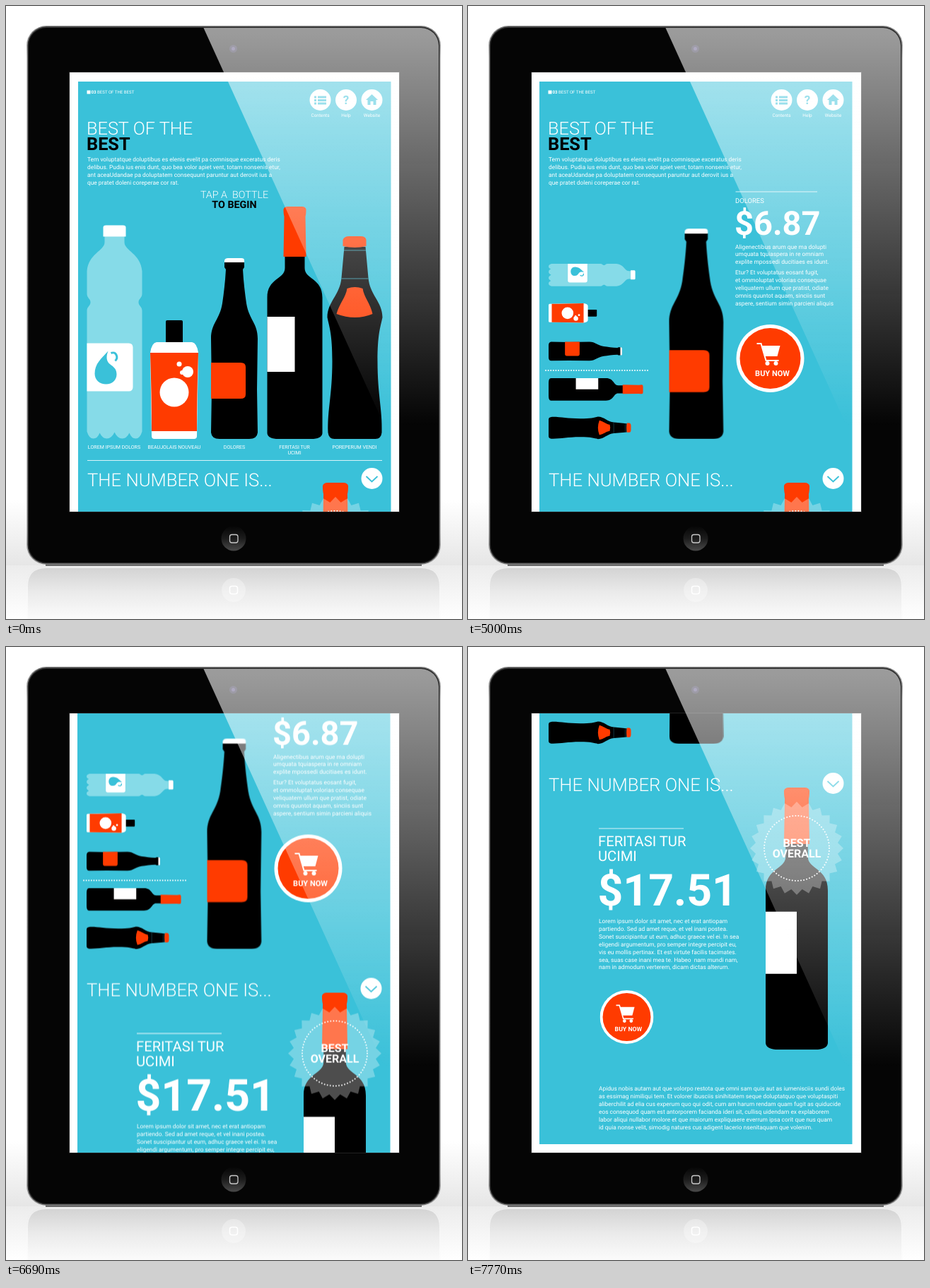
An HTML page for the animation above (8700 ms loop, 645 px wide and 868 px high).

```html
<!DOCTYPE html>
<html lang="en">
<head>
<meta charset="utf-8">
<title>Best of the Best</title>
<style>
  html, body { margin: 0; width: 100%; height: 100%; overflow: hidden; background: #fff; }
  svg { display: block; width: 645px; height: 868px; }
  text { font-family: Roboto, "Open Sans", sans-serif; fill: #fff; text-rendering: geometricPrecision; white-space: pre; }
  .copy { font-size: 8.35px; }
  .light { font-weight: 300; }
  .bold { font-weight: 700; }
  .ink { fill: #000; }
  .mid { text-anchor: middle; }
  .tag { font-size: 7.07px; text-anchor: middle; }
  .nav { font-size: 6.5px; text-anchor: middle; }
  .name { font-size: 9.45px; }
  .price { font-size: 47px; font-weight: 700; }
  .red { fill: #ff3b00; }
  .cyan { fill: #3ac1d9; }
  .white { fill: #fff; }
  .rule { stroke: #fff; stroke-width: 1; opacity: .8; }
  .dots { fill: none; stroke: #fff; stroke-width: 2; stroke-linecap: round; stroke-dasharray: 0 3.6; }

  .nudge, .home, .cue, .detail, .water, .can, .beer { animation: 8700ms step-end infinite; }
  .nudge { animation-name: nudge; }
  .home { animation-name: home; }
  .cue { animation-name: cue; }
  .detail { animation-name: detail; }
  .water { animation-name: water; }
  .can { animation-name: can; }
  .beer { animation-name: beer; }
  .scroll { animation: scroll 8700ms linear infinite; }
  @keyframes nudge {
    0%, 22.989% { transform: translateX(1px); }
    11.839%, 34.483%, 100% { transform: translateX(0); }
  }
  @keyframes home { 0% { opacity: 1; } 34.483%, 100% { opacity: 0; } }
  @keyframes cue { 0%, 22.989% { opacity: 1; } 11.839%, 34.483%, 100% { opacity: 0; } }
  @keyframes detail { 0% { opacity: 0; } 34.483%, 100% { opacity: 1; } }
  @keyframes water { 0%, 45.977%, 100% { opacity: 0; } 34.483% { opacity: 1; } }
  @keyframes can { 0%, 57.471%, 100% { opacity: 0; } 45.977% { opacity: 1; } }
  @keyframes beer { 0% { opacity: 0; } 57.471%, 100% { opacity: 1; } }
  @keyframes scroll {
    0% { transform: translateY(0); }
    68.9655% { transform: translateY(0); animation-timing-function: steps(59, end); }
    89.3103%, 100% { transform: translateY(-476px); }
  }
</style>
</head>
<body>
<svg viewBox="0 0 645 868">
  <defs>
    <linearGradient id="floor" x2="0" y2="1">
      <stop offset="0" stop-color="#fff"/><stop offset="1" stop-color="#e6e6e6"/>
    </linearGradient>
    <linearGradient id="below" x2="0" y2="1">
      <stop offset="0" stop-color="#ececec"/><stop offset="1" stop-color="#fff"/>
    </linearGradient>
    <linearGradient id="mirror" x2="0" y2="1">
      <stop offset="0" stop-color="#d2d2d2"/><stop offset=".5" stop-color="#ebebeb"/><stop offset="1" stop-color="#fbfbfb"/>
    </linearGradient>
    <linearGradient id="metal" x2="0" y2="1">
      <stop offset="0" stop-color="#777"/><stop offset=".06" stop-color="#c9c9c9"/>
      <stop offset=".94" stop-color="#bbb"/><stop offset="1" stop-color="#888"/>
    </linearGradient>
    <linearGradient id="shine" gradientUnits="userSpaceOnUse" x1="0" y1="30" x2="0" y2="595">
      <stop offset="0" stop-color="#fff" stop-opacity=".61"/><stop offset="1" stop-color="#fff" stop-opacity="0"/>
    </linearGradient>
    <linearGradient id="button" x2="0" y2="1">
      <stop offset="0" stop-color="#060606"/><stop offset=".5" stop-color="#1c1c1c"/><stop offset="1" stop-color="#4a4a4a"/>
    </linearGradient>
    <clipPath id="screen"><rect x="90" y="94" width="466" height="622"/></clipPath>
    <clipPath id="body"><rect x="32" y="31" width="580" height="757" rx="25"/></clipPath>

    <!-- bottles stand on y = 0 with their left side at x = 0 -->
    <g id="waterBottle">
      <path fill="#86dbe8" d="M25 -287V-278C25 -266 2 -262 0 -237V-205C0 -199 5 -198 5 -193C5 -188 0 -187 0 -181V-10Q3 0 9 0Q15 0 18 -8Q22 0 28 0Q35 0 39 -9Q43 0 50 0Q56 0 60 -8Q63 0 69 0Q75 0 78 -10V-181C78 -187 73 -188 73 -193C73 -198 78 -199 78 -205V-237C76 -262 53 -266 53 -278V-287Z"/>
      <path class="white" d="M23 -286V-299Q23 -302 27 -302H51Q55 -302 55 -299V-286ZM0 -135H59Q65 -135 65 -129V-73Q65 -67 59 -67H0Z"/>
      <path class="cyan" d="M30 -124C20 -113 11 -106 11 -92C11 -83 18 -77 27 -77C36 -77 42 -83 42 -91C42 -99 37 -102 33 -105C27 -109 27 -117 30 -124Z"/>
      <path fill="none" stroke="#3ac1d9" stroke-width="3" d="M34 -121C41 -124 45 -115 40 -110"/>
    </g>
    <g id="canBottle">
      <rect x="22" y="-168" width="24" height="36" rx="2"/>
      <path class="white" d="M9 -137H59Q66 -136 68 -122L66 -4Q66 0 62 0H6Q2 0 2 -4L0 -122Q2 -136 9 -137Z"/>
      <path class="red" d="M0 -122H68Q66 -60 66 -11H2Q2 -60 0 -122Z"/>
      <g class="white"><circle cx="34" cy="-66" r="20.5"/><circle cx="53" cy="-95" r="8"/><circle cx="41" cy="-106" r="3.5"/><circle cx="45" cy="-94" r="3"/></g>
    </g>
    <g id="beerBottle">
      <path d="M19 -251H47V-243L45 -240C46 -222 48 -206 50 -192C54 -168 66 -164 66 -142L65 -70L66 -9Q65 0 54 0H12Q1 0 0 -9L1 -70L0 -142C0 -164 12 -168 16 -192C18 -206 20 -222 21 -240L19 -243Z"/>
      <path class="white" d="M19 -250V-253Q20 -256 24 -256H43Q47 -256 47 -253V-250Z"/>
      <path class="red" d="M0 -108H42Q49 -108 49 -102V-63Q49 -57 42 -57H0Z"/>
    </g>
    <g id="wineBottle">
      <path d="M25 -260H53V-242C53 -226 78 -228 78 -200V-8Q77 0 62 0H16Q1 0 0 -8V-200C0 -228 25 -226 25 -242Z"/>
      <path class="red" d="M23 -258L24 -315Q23 -318 23 -325Q24 -329 29 -329H49Q54 -329 55 -325Q55 -318 54 -315L55 -258Z"/>
      <path class="white" d="M0 -173H39V-95H0Z"/>
    </g>
    <g id="sparkling">
      <path d="M24 -272H54L58 -228C60 -204 78 -194 78 -172C75 -158 71 -148 71 -110C71 -62 78 -42 77 -9Q76 0 68 0H10Q2 0 1 -9C0 -42 7 -62 7 -110C7 -148 3 -158 0 -172C0 -194 18 -204 20 -228Z"/>
      <path fill="none" stroke="#3ac1d9" stroke-width=".7" d="M23 -267H55M20 -227H58"/>
      <path class="red" d="M22 -273V-282Q24 -287 31 -287H47Q54 -287 55 -282V-273Q39 -269 22 -273ZM28 -213Q39 -217 50 -213C52 -200 61 -192 64 -177Q52 -172 39 -172Q26 -172 13 -177C17 -192 26 -200 28 -213Z"/>
    </g>

    <g id="buy">
      <circle r="48" class="white"/><circle r="43" class="red"/>
      <path fill="none" stroke="#fff" stroke-width="2" d="M-19 -21H-13L-6 3H12"/>
      <path class="white" d="M-12 -18H14L10 -3H-8Z"/>
      <circle class="white" cx="-4" cy="7" r="3"/><circle class="white" cx="8" cy="7" r="3"/>
      <text class="bold mid" x="3" y="25" font-size="11">BUY NOW</text>
    </g>
  </defs>

  <!-- floor and reflection -->
  <rect y="700" width="645" height="92" fill="url(#floor)"/>
  <rect y="792" width="645" height="76" fill="url(#below)"/>
  <path fill="url(#mirror)" d="M29 868V822Q29 794 57 794H587Q615 794 615 822V868Z"/>
  <path fill="none" stroke="#fff" stroke-opacity=".6" stroke-width="2" d="M30 868V822Q30 795 57 795H587Q614 795 614 822V868"/>
  <circle cx="322" cy="827" r="17" fill="#fff" opacity=".3"/>
  <rect x="316.500" y="821.500" width="11" height="11" rx="3" fill="none" stroke="#fff" stroke-width="1.500"/>
  <path d="M56 791.500H588" stroke="#555" stroke-width="2.500"/>

  <!-- tablet -->
  <rect x="29" y="28" width="586" height="763" rx="28" fill="url(#metal)"/>
  <rect x="30.500" y="29.500" width="583" height="760" rx="26.500" fill="#2a2a2a"/>
  <rect x="32" y="31" width="580" height="757" rx="25" fill="#050505"/>
  <circle cx="321.500" cy="60.500" r="5.500" fill="#1b1730"/>
  <circle cx="321.500" cy="60.500" r="2.500" fill="#43386e"/>
  <circle cx="322" cy="754" r="17.500" fill="url(#button)"/>
  <rect x="316.500" y="748.500" width="11.500" height="11.500" rx="3" fill="none" stroke="#c8c8c8" stroke-width="1.300"/>
  <rect x="89" y="93" width="468" height="624" fill="#222"/>

  <g clip-path="url(#screen)">
    <rect x="90" y="94" width="466" height="622" fill="#fff"/>
    <g class="scroll"><g class="nudge">
      <rect class="cyan" x="101" y="107" width="442.500" height="1073"/>

      <!-- header -->
      <rect class="white" x="113.500" y="119.500" width="5" height="5"/>
      <text class="bold" x="119.500" y="124.300" font-size="6.200">03</text>
      <text x="128" y="124.300" font-size="6.100">BEST OF THE BEST</text>
      <g class="white"><circle cx="443.500" cy="133" r="15"/><circle cx="480" cy="133" r="15"/><circle cx="516.500" cy="133" r="15"/></g>
      <g class="cyan">
        <path d="M435 127.500h3v3h-3zm5 0h12v3h-12zm-5 4.500h3v3h-3zm5 0h12v3h-12zm-5 4.500h3v3h-3zm5 0h12v3h-12z"/>
        <path d="M516.500 125L525 133H522.500V140H518.500V135H514.500V140H510.500V133H508Z"/>
      </g>
      <text class="bold mid" x="480" y="139" font-size="17" style="fill:#3ac1d9">?</text>
      <text class="nav" x="443.500" y="157">Contents</text>
      <text class="nav" x="480" y="157">Help</text>
      <text class="nav" x="516.500" y="157">Website</text>
      <text class="light" x="113" y="182" font-size="25.300">BEST OF THE</text>
      <text class="bold ink" x="113" y="204" font-size="25.300">BEST</text>
      <text class="copy" x="114" y="220">Tem voluptatque doluptibus es elenis evelit pa comnisque exceratus deris
delibus. Pudia ius enis dunt, quo bea volor apiet vent, totam nonsenis etur,
ant aceaUdandae pa doluptatem consequunt paruntur aut derovit ius a
que pratet doleni coreperae cor rat.</text>

      <!-- shelf of five -->
      <g class="home">
        <use href="#waterBottle" x="113.500" y="612.500"/>
        <use href="#canBottle" x="203" y="613"/>
        <use href="#beerBottle" x="289" y="613"/>
        <use href="#wineBottle" x="368.500" y="613"/>
        <use href="#sparkling" x="453.500" y="613"/>
        <text class="tag" x="152" y="626.500">LOREM IPSUM DOLORS</text>
        <text class="tag" x="237" y="626.500">BEAUJOLAIS NOUVEAU</text>
        <text class="tag" x="322" y="626.500">DOLORES</text>
        <text class="tag" x="407" y="626.500">FERITASI TUR</text>
        <text class="tag" x="407" y="635">UCIMI</text>
        <text class="tag" x="492" y="626.500">POREPERUM VENDI</text>
        <path class="rule" d="M114 643.500H531"/>
      </g>
      <g class="cue">
        <text class="light mid" x="322" y="271.500" font-size="14.300">TAP A  BOTTLE</text>
        <text class="bold ink mid" x="322" y="286" font-size="14.300">TO BEGIN</text>
      </g>

      <!-- single bottle -->
      <g class="detail">
        <g id="rack"></g>
        <path class="rule" d="M378.500 263H494"/>
        <use href="#buy" x="427.500" y="499"/>
        <g class="water">
          <path class="dots" d="M110 408H257"/>
          <use href="#waterBottle" x="283.500" y="612.500"/>
          <text class="name" x="378" y="279">LOREM IPSUM DOLORS</text>
          <text class="price" x="377" y="324">$2.99</text>
          <text class="copy" x="378" y="343">Lorem ipsum dolor sit amet, nec et erat
antiopam partiendo. Sedam am reque, et
vel inani postea. Sonet suscipiantur ut
eum, adhuc graece vel ei. In sea eligendi
argumentum, pro semper integre
percipit eu, vis eu mollis pertinax. Et est
virtute facilis tacimates. sea, suas case.</text>
        </g>
        <g class="can">
          <path class="dots" d="M110 462H257"/>
          <use href="#canBottle" transform="translate(271 613) scale(1.5)"/>
          <text class="name" x="378" y="279">BEAUJOLAIS NOUVEAU</text>
          <text class="price" x="377" y="324">$4.25</text>
          <text class="copy" x="378" y="343">Apidus nobis autam aut que volorpo
restota que omni sam quis aut as
iumenisciis sundi doles as essimag
nimiliqui tem. Et volorer ibusciis
sinihitatem seque doluptatquo que
voluptaspiti aliberchilit ad elia cus.</text>
        </g>
        <g class="beer">
          <path class="dots" d="M110 516H257"/>
          <use href="#beerBottle" transform="translate(284.500 613) scale(1.163)"/>
          <text class="name" x="378" y="279">DOLORES</text>
          <text class="price" x="377" y="324">$6.87</text>
          <text class="copy" x="378" y="343.500">Aligenectibus arum que ma dolupti
umquata tquiaspera in re omniam
explite mpossedi ducitiaes es idunt.</text>
          <text class="copy" x="378" y="380">Etur? Et voluptatus eosant fugit,
et ommoluptat volorias consequae
veliquatem ullum que pratist, odiate
omnis quuntot aquam, sinciis sunt
aspere, sentium simin parcieni aliquis</text>
        </g>
      </g>

      <!-- winner -->
      <text class="light" x="114" y="680" font-size="25.700">THE NUMBER ONE IS...</text>
      <circle class="white" cx="516.500" cy="669" r="15"/>
      <path fill="none" stroke="#3ac1d9" stroke-width="1.800" d="M508.500 666L516.500 673.500L524.500 666"/>
      <use href="#wineBottle" transform="translate(421 1046) scale(1.128)"/>
      <polygon id="burst" class="white" opacity=".3"/>
      <circle class="dots" cx="465" cy="761" r="46" stroke-dasharray="0 4.130" style="stroke-dasharray:0 4.130"/>
      <text class="bold mid" x="465" y="759" font-size="16">BEST</text>
      <text class="bold mid" x="465" y="773.500" font-size="16">OVERALL</text>
      <path class="rule" d="M185 733H305"/>
      <text x="184" y="758" font-size="20.200">FERITASI TUR</text>
      <text x="184" y="778.500" font-size="20.200">UCIMI</text>
      <text class="bold" x="183.500" y="842" font-size="62.500">$17.51</text>
      <text class="copy" x="185" y="867">Lorem ipsum dolor sit amet, nec et erat antiopam
partiendo. Sed ad amet reque, et vel inani postea.
Sonet suscipiantur ut eum, adhuc graece vel ei. In sea
eligendi argumentum, pro semper integre percipit eu,
vis eu mollis pertinax. Et est virtute facilis tacimates.
sea, suas case inani mea te. Habeo  nam mundi nam,
nam in admodum verterem, dicam dictas alterum.</text>
      <use href="#buy" transform="translate(224.500 1000) scale(.79)"/>
      <text class="copy" x="185" y="1104">Apidus nobis autam aut que volorpo restota que omni sam quis aut as iumenisciis sundi doles
as essimag nimiliqui tem. Et volorer ibusciis sinihitatem seque doluptatquo que voluptaspiti
aliberchilit ad elia cus experum quo qui odit, cum am harum rendam quam fugit as quiducide
eos consequod quam est antorporem facianda ideri sit, cullisq uidendam ex explaborem
labor aliqui nullabor molore et que maiorum expliquaere everrum ipsa corit que nus quam
id quia nonse velit, simodig natures cus adigent lacerio nsenitaquam que volenim.</text>
    </g></g>
  </g>

  <polygon clip-path="url(#body)" fill="url(#shine)" points="279,30 615,30 615,600 538,600"/>
</svg>
<script>
  const NS = 'http://www.w3.org/2000/svg';
  const add = (parent, tag, attrs) => {
    const node = parent.appendChild(document.createElementNS(NS, tag));
    for (const key in attrs) node.setAttribute(key, attrs[key]);
    return node;
  };

  // one tspan for each line of a paragraph
  const LEADING = 10.9;
  document.querySelectorAll('.copy').forEach(block => {
    const lines = block.textContent.split('\n');
    block.textContent = '';
    lines.forEach((line, i) => {
      add(block, 'tspan', { x: block.getAttribute('x'), dy: i && LEADING }).textContent = line;
    });
  });

  // bottles lying on their side
  const rack = document.getElementById('rack');
  const shelf = { waterBottle: 365, canBottle: 421, beerBottle: 475.5, wineBottle: 527, sparkling: 581.5 };
  for (const id in shelf) {
    add(rack, 'use', { href: '#' + id, transform: `translate(114 ${shelf[id]}) rotate(90) scale(.406)` });
  }

  const TEETH = 24;
  const points = Array.from({ length: TEETH * 2 }, (_, i) => {
    const radius = i % 2 ? 58.5 : 66;
    const angle = i * Math.PI / TEETH;
    return [465 + radius * Math.cos(angle), 761 + radius * Math.sin(angle)].map(v => v.toFixed(2));
  });
  document.getElementById('burst').setAttribute('points', points.join(' '));
</script>
</body>
</html>
```
